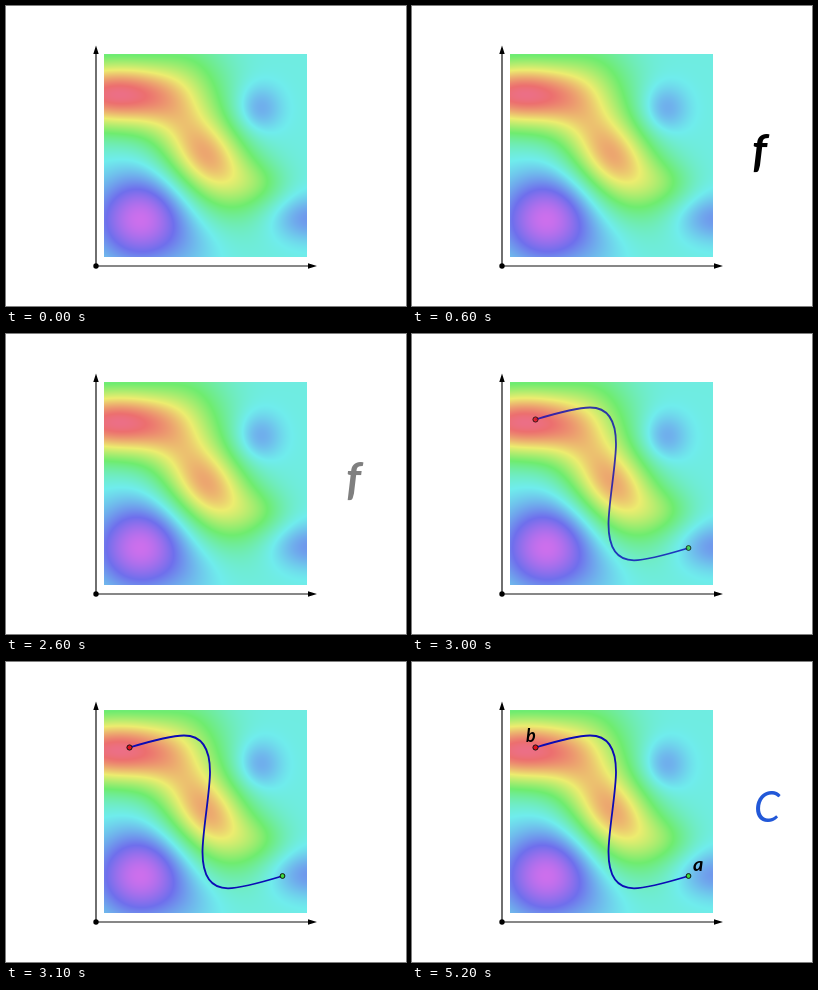
Recreate the animation shown at these times as an HTML page with a canvas. Size 400 px wide and 300 px high, loop 8000 ms.

```html
<!DOCTYPE html>
<html>
<head>
<meta charset="utf-8">
<style>
html, body { margin: 0; overflow: hidden; background: #fff; }
canvas { display: block; width: 400px; height: 300px; }
</style>
</head>
<body>
<canvas id="stage" width="400" height="300"></canvas>
<script>
const ctx = document.getElementById('stage').getContext('2d');
const LOOP = 8000, LEFT = 98, TOP = 48, SIZE = 203;

// Hue bumps: [height, x, y, sigma x, sigma y, rotation]
const bumps = [
  [-182, 108, 88, 54, 25, 0],
  [-148, 200, 150, 42, 27, 0.877],
  [-26, 185, 55, 28, 28, 0],
  [-28, 255, 176, 20, 16, 0],
  [110, 134, 213, 33, 31, 0],
  [12, 188, 245, 22, 22, 0],
  [43, 252, 102, 17, 18, 0],
  [47, 303, 212, 28, 17, 0]
];

function hueAt(x, y) {
  return bumps.reduce((hue, [height, cx, cy, sx, sy, turn]) => {
    const dx = x - cx, dy = y - cy, c = Math.cos(turn), s = Math.sin(turn);
    const u = (dx * c + dy * s) / sx, v = (dy * c - dx * s) / sy;
    return hue + height * Math.exp(-(u * u + v * v) / 2);
  }, 175);
}

function makeField() {
  const field = document.createElement('canvas');
  field.width = field.height = SIZE;
  const g = field.getContext('2d');
  for (let y = 0; y < SIZE; y++) {
    for (let x = 0; x < SIZE; x++) {
      g.fillStyle = `hsl(${hueAt(x + LEFT, y + TOP)}, 77%, 68%)`;
      g.fillRect(x, y, 1, 1);
    }
  }
  return field;
}

const field = makeField();
const axes = new Path2D('M90 260V46M90 260H304');
const heads = new Path2D('M90 39.5l2.7 8.5h-5.4zM311 260l-9-2.7v5.4z');
const curve = new Path2D('M123.5 85.5C145 79 165 73.5 178 73.5' +
  'C197 73.5 204 88 204 110C204 130 196.5 170 196.5 190' +
  'C196.5 212 203 226.3 222 226.3C235 226.3 255 220.5 276.5 214');

function dot(x, y, r, fill) {
  ctx.beginPath();
  ctx.arc(x, y, r, 0, 2 * Math.PI);
  ctx.fillStyle = fill;
  ctx.fill();
}

function ringedDot(x, y, r, fill) {
  dot(x, y, r, fill);
  ctx.strokeStyle = '#111';
  ctx.lineWidth = 1;
  ctx.stroke();
}

// Centres a letter's ink on (x, y) at the given ink height.
function letter(char, x, y, height, weight, color) {
  const setFont = size => {
    ctx.font = `italic ${weight} ${size}px Lato, "Open Sans", sans-serif`;
    return ctx.measureText(char);
  };
  let m = setFont(100);
  m = setFont(100 * height / (m.actualBoundingBoxAscent + m.actualBoundingBoxDescent));
  ctx.fillStyle = color;
  ctx.fillText(char,
    x + (m.actualBoundingBoxLeft - m.actualBoundingBoxRight) / 2,
    y + (m.actualBoundingBoxAscent - m.actualBoundingBoxDescent) / 2);
}

// Stepped fade, one step every 100 ms.
function fade(t, start, steps) {
  const done = Math.floor((t - start) / 100) + 1;
  return Math.min(1, Math.max(0, done / steps));
}

function draw(t) {
  ctx.globalAlpha = 1;
  ctx.fillStyle = '#fff';
  ctx.fillRect(0, 0, 400, 300);
  ctx.drawImage(field, LEFT, TOP);

  ctx.strokeStyle = '#111';
  ctx.lineWidth = 1.2;
  ctx.stroke(axes);
  ctx.fillStyle = '#000';
  ctx.fill(heads);
  dot(90, 260, 2.7, '#000');

  ctx.globalAlpha = fade(t, 500, 2) - fade(t, 2600, 2);
  letter('f', 349.5, 147, 39, 700, '#000');

  ctx.globalAlpha = fade(t, 2700, 5);
  ctx.strokeStyle = '#0b0bb5';
  ctx.lineWidth = 1.8;
  ctx.stroke(curve);
  ringedDot(123.5, 85.5, 2.6, '#e0101c');
  ringedDot(276.5, 214, 2.4, '#3ddc3d');

  ctx.globalAlpha = fade(t, 5100, 2);
  letter('b', 119, 72.5, 13.5, 700, '#000');
  letter('a', 286, 203.7, 10.5, 700, '#000');
  letter('C', 356.5, 144.5, 31, 400, '#2258d8');
}

function frame() {
  draw(performance.now() % LOOP);
  requestAnimationFrame(frame);
}
frame();
</script>
</body>
</html>
```
